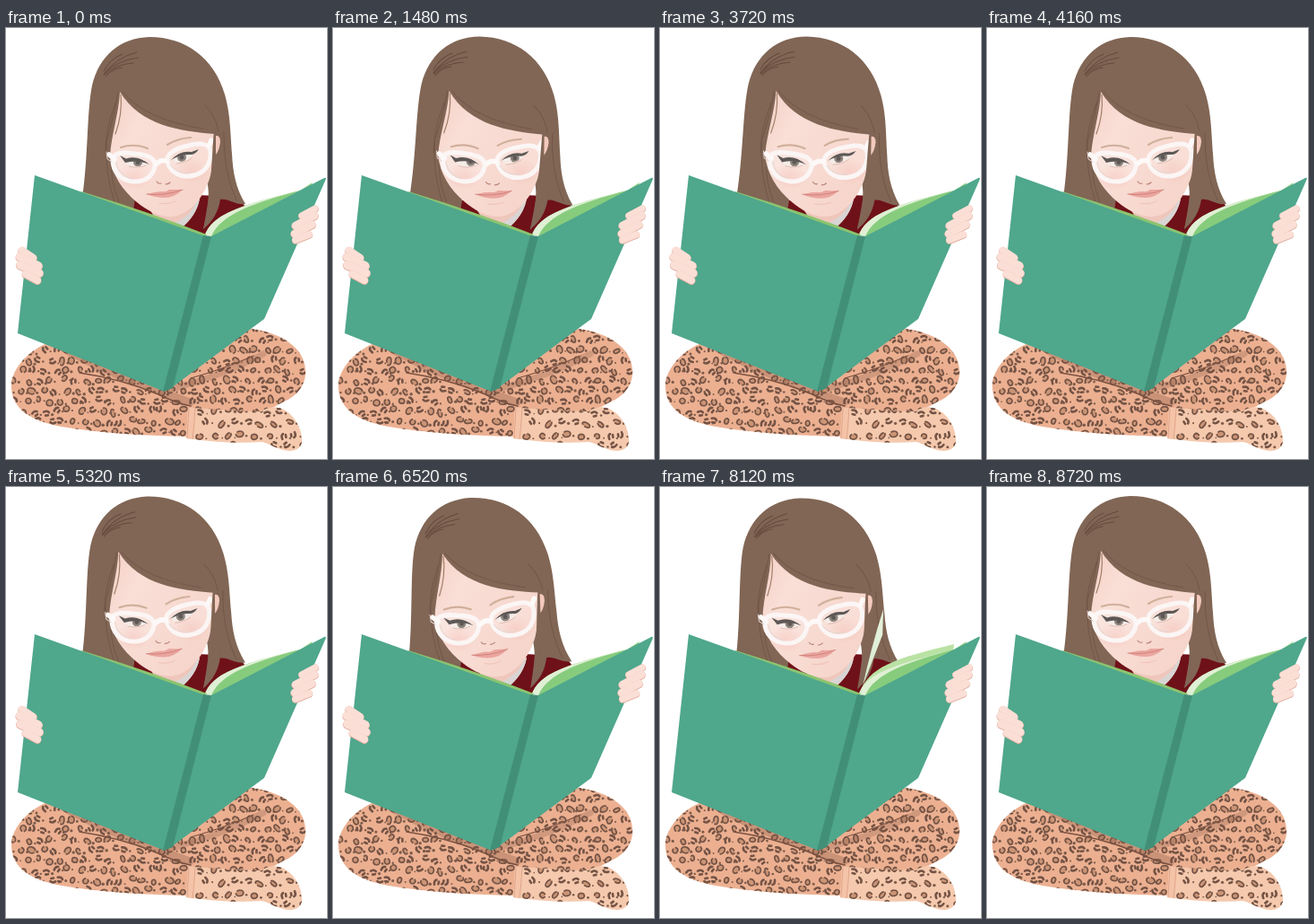
An HTML page for the animation above (9280 ms loop, 358 px wide and 480 px high).

```html
<!DOCTYPE html>
<html lang="en">
<head>
<meta charset="utf-8">
<title>Girl reading</title>
<style>
html, body { margin: 0; width: 100%; height: 100%; overflow: hidden; background: #fff; }
svg { display: block; width: 100%; height: 100%; }
.line { fill: none; stroke-linecap: round; stroke-linejoin: round; }
</style>
</head>
<body>
<svg viewBox="0 0 358 480" preserveAspectRatio="none">
  <defs>
    <path id="legShape" d="M46 351C24 360 6 380 6 399C6 424 28 438 62 444C105 451 150 454 203 455L205 432C245 434 290 430 306 418C324 411 335 398 334 381C333 357 309 340 274 335L180 350Z"/>
    <path id="sockShape" d="M203 423C232 424 262 427 285 427C290 423 298 421 305 423C321 428 331 447 330 461C328 471 318 473 306 469C297 466 292 462 285 461C258 463 230 461 201 457Z"/>
    <clipPath id="legClip"><use href="#legShape"/></clipPath>
    <clipPath id="sockClip"><use href="#sockShape"/></clipPath>
    <clipPath id="eyeL"><path d="M132 147Q146 141 159 151Q147 157 136 153Z"/></clipPath>
    <clipPath id="eyeR"><path d="M185 146Q195 136 210 139Q205 149 189 150Z"/></clipPath>
    <linearGradient id="skin" x2="1" y2=".6">
      <stop offset="0" stop-color="#f5cfc5"/><stop offset=".3" stop-color="#f9dfd7"/><stop offset="1" stop-color="#f6d5cb"/>
    </linearGradient>
    <linearGradient id="leaf">
      <stop offset="0" stop-color="#cfe7c8"/><stop offset="1" stop-color="#e6f2dd"/>
    </linearGradient>
    <radialGradient id="blush">
      <stop offset="0" stop-color="#f0aaa0" stop-opacity=".4"/><stop offset="1" stop-color="#f0aaa0" stop-opacity="0"/>
    </radialGradient>
    <g id="leftHand"></g>
  </defs>

  <!-- legs -->
  <use href="#legShape" fill="#ecb091"/>
  <g clip-path="url(#legClip)">
    <g id="legSpots"></g>
    <g class="line" stroke="#7b5140">
      <path d="M70 360Q125 389 178 407L205 417" stroke-width="9" opacity=".3"/>
      <path d="M82 384Q130 391 170 408Q190 418 206 421" stroke-width="1.5"/>
      <path d="M188 401Q240 388 287 363" stroke-width="7" opacity=".25"/>
      <path d="M206 390Q245 379 276 365" stroke-width="1.2"/>
    </g>
  </g>
  <use href="#sockShape" fill="#f5c9ad"/>
  <g clip-path="url(#sockClip)">
    <g id="sockSpots"></g>
    <path d="M201 420H211L208 460H199Z" fill="#f4c3a8"/>
    <path class="line" d="M211 424Q210 442 208 459M204 424L202 457" stroke="#e0a58a"/>
  </g>

  <!-- body -->
  <path d="M134 192H160L166 216H134Z" fill="#6f1118"/>
  <path d="M213 186L258 188L267 199L224 236L186 222Z" fill="#6f1118"/>
  <path d="M152 190H216Q212 210 194 224L168 214Z" fill="#efc6bb"/>
  <path d="M216 190Q213 209 194 224L184 219Q206 210 212 194Z" fill="#d9d5d4"/>

  <g id="head">
    <path d="M160 10C127 11 104 31 96 64C90 94 92 140 85 190L141 210L150 150H218L224 170C228 185 225 205 220 224C231 215 237 204 239 191C247 189 257 198 267 196C256 178 253 160 252 140C250 112 250 95 244 74C232 33 200 10 160 10Z" fill="#816655"/>
    <g class="line" stroke="#65493d" stroke-width="1">
      <path d="M109 52Q122 33 146 27M110 50Q125 36 147 33M110 52Q123 40 142 39M111 54Q119 45 129 44M109 48Q116 34 130 29"/>
      <path d="M125 72Q119 105 112 126Q110 160 121 194M122 84Q110 115 111 140M118 150Q116 170 126 194" opacity=".5"/>
      <path d="M130 71Q155 102 219 112M222 86Q238 101 239 130M243 116Q242 160 257 192M236 140Q242 170 238 190" opacity=".5"/>
    </g>
    <path d="M127 71C126 95 117 120 116 143C118 163 130 181 146 194C160 206 178 213 191 209C207 204 220 189 227 168C231 155 233 135 233 118C195 115 150 109 127 71Z" fill="url(#skin)"/>
    <path class="line" d="M128 74Q130 96 122 118" stroke="#a18068" stroke-width="1.2"/>

    <g id="face">
      <ellipse cx="142" cy="166" rx="20" ry="15" fill="url(#blush)"/>
      <ellipse cx="207" cy="158" rx="20" ry="15" fill="url(#blush)"/>
      <g class="line" stroke="#d0b09b" stroke-width="2.2">
        <path d="M128 133Q143 128 158 134"/><path d="M180 130Q191 123 206 122"/>
      </g>
      <path d="M132 147Q146 141 159 151Q147 157 136 153Z" fill="#f3e8e3"/>
      <path d="M185 146Q195 136 210 139Q205 149 189 150Z" fill="#f3e8e3"/>
      <g clip-path="url(#eyeL)"><g class="iris"><circle cx="147" cy="149.5" r="5" fill="#746a60"/><circle cx="147" cy="149.5" r="2.5" fill="#3b3431"/></g></g>
      <g clip-path="url(#eyeR)"><g class="iris"><circle cx="196" cy="144" r="5" fill="#746a60"/><circle cx="196" cy="144" r="2.5" fill="#3b3431"/></g></g>
      <path d="M127 142L134 145.500Q147 141 160 152Q147 146 133 150Z" fill="#393331"/>
      <path d="M184 147Q194 136 207 138L215 135Q211 141 206 141Q195 140 184 147Z" fill="#393331"/>
      <path class="line" d="M137 154Q147 157 156 153M190 151Q201 150 207 145" stroke="#d0a899" stroke-width=".8"/>

      <g fill="#fff" fill-opacity=".18" stroke="#fbf6f5" stroke-width="5">
        <path d="M119 147C119 139 130 138 143 140C160 141 167 146 166 154C164 166 153 172 142 171C128 170 119 160 119 147Z"/>
        <path d="M180 149C178 140 189 134 203 131C218 127 227 129 228 138C229 151 222 161 210 164C196 168 184 162 180 149Z"/>
      </g>
      <g class="line" stroke="#fdf9f8" stroke-width="5.500">
        <path d="M115 141L121 146M168 151Q173 146 179 148M227 130L229 125"/>
      </g>
      <path class="line" d="M112 138L113 146L118 149M123 150Q125 164 140 168M183 152Q189 163 207 161" stroke="#e6d6d1" stroke-width="1"/>
      <path class="line" d="M168 171Q170 174 173 173M178 174Q181 174 183 172" stroke="#bb8578" stroke-width="1.2"/>
      <path d="M157 185Q168 182 174 182Q178 183 182 180Q190 180 197 180Q188 189 177 189Q166 189 157 185Z" fill="#eaa59f"/>
      <path class="line" d="M157 185Q167 186 176 185Q187 184 197 180" stroke="#cf8079" stroke-width=".9"/>
      <path class="line" d="M171 195Q180 197 189 193" stroke="#f0c5ba" stroke-width="1.2"/>
    </g>
    <path d="M232 114C229 148 230 175 220 224C231 213 238 200 240 180C244 155 241 130 238 116Z" fill="#816655"/>
    <path d="M234 120Q239 119 239 127Q238 136 234 141Z" fill="#f4cabe"/>
  </g>

  <!-- pages -->
  <path id="fan" fill="#b9e2a4"/>
  <path d="M221 232C230 207 258 199 328 181L330 190L232 236Z" fill="#dff0d5"/>
  <path d="M229 232C239 208 275 195 328 181L342 172L335 186L235 236Z" fill="#87cc7d"/>
  <path id="page" fill="url(#leaf)"/>
  <path d="M84 182Q160 205 224 230L220 234L84 187Z" fill="#8cc46f"/>
  <use id="handBack" href="#leftHand"/>

  <!-- cover -->
  <path d="M32 164L222 232L177 405L13 340Z" fill="#4fa78c"/>
  <path d="M227 233L355 167Q358 166 356 170L288 324L180 404Z" fill="#4fa78c"/>
  <path d="M220 231L229 232L186 401L175 405Z" fill="#428f78"/>
  <use id="handFront" href="#leftHand"/>
  <g id="rightHand"></g>
</svg>

<script>
const $ = id => document.getElementById(id);
const LOOP = 9280, STEP = 40;

// fingers: x1, y1, x2, y2, width
function fingers(rows) {
  return rows.map(([a, b, c, d, w]) => {
    const seg = (color, dy, width) =>
      `<path class="line" d="M${a} ${b + dy}L${c} ${d + dy}" stroke="${color}" stroke-width="${width}"/>`;
    return seg('#e3b0a2', .6, w) + seg('#fbdfd6', 0, w - .8);
  }).join('');
}
$('leftHand').innerHTML = fingers([
  [18, 248, 30, 256, 9.5], [15.5, 255, 36, 265, 10],
  [16, 264, 37, 273, 10], [22, 274, 35, 281, 9]]);
$('rightHand').innerHTML = fingers([
  [345, 201, 330, 209, 8], [344, 209, 323, 220, 9.5],
  [341, 219, 322, 229, 9.5], [338, 230, 323, 236, 8.5]]);

let seed = 11;
const rnd = () => (seed = seed * 16807 % 2147483647) / 2147483647;

function spots(id, x0, y0, x1, y1, gap) {
  let out = '';
  for (let y = y0, row = 0; y < y1; y += gap * .87, row++) {
    for (let x = x0 + row % 2 * gap / 2; x < x1; x += gap) {
      const px = x + rnd() * 6 - 3, py = y + rnd() * 5 - 2.5;
      const rx = 2.8 + rnd() * 2, ry = 2 + rnd() * 1.4;
      const at = `transform="translate(${px} ${py}) rotate(${rnd() * 360})"`;
      out += rnd() < .6
        ? `<ellipse ${at} rx="${rx}" ry="${ry}" fill="#cb9475" stroke="#745345" stroke-width="1.7" stroke-dasharray="${9 + rnd() * 14} 2"/>`
        : `<path ${at} class="line" d="M-3 1Q-1 -3 2 -2M3 1L1 3" stroke="#745345" stroke-width="2.6"/>`;
      out += `<circle cx="${px + gap * .5}" cy="${py + 2}" r="${.8 + rnd()}" fill="#7d5b4a"/>`;
    }
  }
  $(id).innerHTML = out;
}
spots('legSpots', 4, 336, 340, 460, 13);
spots('sockSpots', 217, 427, 336, 475, 15);

const tracks = {
  turn: [[200, 0], [560, 1], [3680, 1], [4160, 0], [5120, 0], [5640, -2], [7960, -2], [8360, 0]],
  shift: [[200, 0], [560, 2], [3680, 2], [4160, 0], [5120, 0], [5640, -1.3], [7960, -1.3], [8360, 0]],
  drop: [[5120, 0], [5640, .8], [6480, .8], [6880, 2.6], [7960, 2.6], [8360, 0]],
  gaze: [[200, 0], [560, 3.5], [1440, 3.5], [2000, 0]],
  leaf: [[7680, 0], [8360, 1]],
  fan: [[7400, 0], [7720, 1], [8120, 1], [8360, 0]],
  slip: [[7400, 0], [7520, -8], [7680, 26], [8400, 26], [8560, -8], [8720, 0]]
};

function value(keys, t) {
  if (t <= keys[0][0]) return keys[0][1];
  for (let i = 1; i < keys.length; i++) {
    const [a, u] = keys[i - 1], [b, v] = keys[i];
    if (t <= b) {
      const p = (t - a) / (b - a);
      return u + (v - u) * p * p * (3 - 2 * p);
    }
  }
  return keys[keys.length - 1][1];
}

const irises = document.querySelectorAll('.iris');
const bend = (a, b, c, p) => a * (1 - p) ** 2 + 2 * b * p * (1 - p) + c * p * p;

function draw(t) {
  const s = {};
  for (const k in tracks) s[k] = value(tracks[k], t);

  $('head').setAttribute('transform', `translate(0 ${s.drop}) rotate(${s.turn} 190 215)`);
  $('face').setAttribute('transform',
    `translate(${s.shift} ${Math.max(0, s.shift) / 2}) rotate(${s.shift * .4} 178 150)`);
  irises.forEach(e => e.setAttribute('transform', `translate(${s.gaze} ${-s.gaze * .2})`));

  // free corner of the turning page sweeps over the fold
  const p = s.leaf, turning = p > 0 && p < 1;
  $('page').style.display = turning ? '' : 'none';
  if (turning) {
    const q = .02 + p * .98;
    const x = bend(32, 190, 328, q), y = bend(163, 74, 180, q);
    const mx = (x + 222) / 2, my = (y + 231) / 2 - 8 * Math.sin(Math.PI * q);
    $('page').setAttribute('d',
      `M${x} ${y}Q${mx} ${my} 224 231L215 250L${x - 1} ${y + 60 * (1 - q) + 12}Z`);
  }
  const up = 6 * s.fan;
  $('fan').setAttribute('d', `M222 231C232 ${206 - up} 262 ${197 - up} 328 ${181 - up}L326 190L232 234Z`);

  const behind = t >= 7520 && t < 8560;
  $('handFront').style.display = behind ? 'none' : '';
  $('handBack').style.display = behind ? '' : 'none';
  for (const id of ['handFront', 'handBack'])
    $(id).setAttribute('transform', `translate(${s.slip} 0)`);
}

const start = performance.now();
function tick() {
  const t = (performance.now() - start) % LOOP;
  draw(Math.floor(t / STEP) * STEP);
  requestAnimationFrame(tick);
}
draw(0);
requestAnimationFrame(tick);
</script>
</body>
</html>
```
